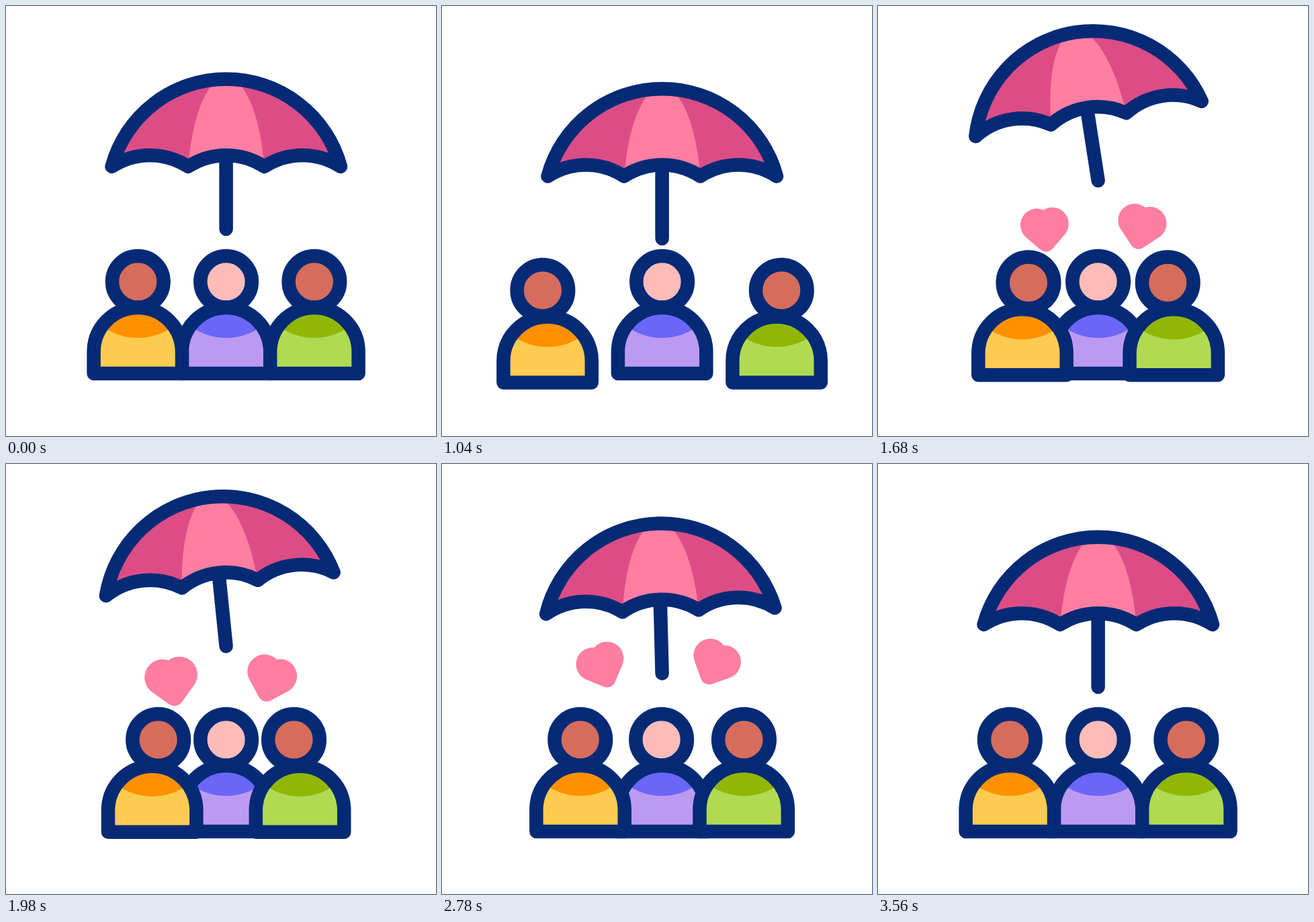
Write an HTML page that moves like this. It is 640 px wide and 640 px high and loops after 3600 ms.

```html
<!DOCTYPE html>
<html lang="en">
<head>
<meta charset="utf-8">
<title>People under an umbrella</title>
<style>
  html, body { margin: 0; height: 100%; overflow: hidden; background: #fff; }
  svg { display: block; width: 100vw; height: 100vh; }
  .line { stroke: #042a76; stroke-width: 20.5; stroke-linecap: round; stroke-linejoin: round; }
</style>
</head>
<body>
<svg id="stage" viewBox="0 0 640 640"></svg>
<script>
const LOOP = 3600;
const CENTER = 327.6;
const PINK = '#ff7ea1';
const stage = document.getElementById('stage');

// Smooth 0 to 1 between two times; a power above 1 delays the start.
function ease(time, start, end, power = 1) {
  const u = Math.min(1, Math.max(0, (time - start) / (end - start))) ** power;
  return u * u * (3 - 2 * u);
}

function add(markup) {
  stage.insertAdjacentHTML('beforeend', markup);
  return stage.lastElementChild;
}

function addUmbrella() {
  const scallop = 'a104 104 0 0 0 -113.5 0';
  const canopy = `M157.5 239A176.4 176.4 0 0 1 498 239${scallop.repeat(3)}Z`;
  const node = add(`<g>
    <path d="${canopy}" fill="#dc4d86"/>
    <path d="M271 239Q280 138 316 108H339.5Q375.5 138 384.5 239${scallop}Z" fill="${PINK}"/>
    <path class="line" d="${canopy}M${CENTER} 223V332" fill="none"/>
  </g>`);
  return (dy, angle) =>
    node.setAttribute('transform', `translate(0 ${dy}) rotate(${angle} ${CENTER} 332)`);
}

function addPerson(x, skin, shirt, collar) {
  const body = 'M-65.7 547V514.7A65.7 65.7 0 0 1 65.7 514.7V547Z';
  const node = add(`<g>
    <circle class="line" r="38.3" fill="${skin}"/>
    <path d="${body}" fill="${shirt}"/>
    <path d="M-53 476.4A65.7 65.7 0 0 1 53 476.4A88.5 88.5 0 0 1 -53 476.4Z" fill="${collar}"/>
    <path class="line" d="${body}" fill="none"/>
  </g>`);
  const head = node.firstElementChild;
  return (dx, dy, lean) => {
    node.setAttribute('transform', `translate(${x + dx} ${dy})`);
    head.setAttribute('cx', lean);
    head.setAttribute('cy', 410.3 - Math.abs(lean) / 12);
  };
}

// Hearts rise steadily, drift sideways and turn while pulsing.
function addHeart(x, y, drift, turn, pulse, birth) {
  const node = add(`<path fill="${PINK}"
    d="M-26.8 8.3A23 23 0 0 1 0 -28.5A23 23 0 0 1 26.8 8.3L8.5 26.5A12 12 0 0 1 -8.5 26.5Z"/>`);
  return time => {
    const p = Math.max(0, (time - 1400) / 1660);
    const scale = 1.08 + pulse * Math.cos((time - 1980) / 1080 * 2 * Math.PI);
    node.setAttribute('transform',
      `translate(${x + drift * p * p} ${y - 48.5 * p}) rotate(${turn(p)}) scale(${scale})`);
    node.setAttribute('opacity', ease(time, birth, birth + 230) - ease(time, 3080, 3420));
  };
}

const umbrella = addUmbrella();
const hearts = [
  addHeart(249, 342, -15.5, p => -27 * p, .09, 1410),
  addHeart(391, 338, 21.5, p => 28 * Math.sqrt(p), .03, 1350)
];
const middle = addPerson(CENTER, '#febcb9', '#bc9af3', '#6a66f7');
const left = addPerson(CENTER - 131.3, '#d66d5c', '#fdcb50', '#ff9100');
const right = addPerson(CENTER + 131.3, '#d66d5c', '#b0da51', '#91b704');

function draw(now) {
  const time = now % LOOP;
  const at = (start, end) => ease(time, start, end);
  const apart = ease(time, 100, 960, 1.575);
  const together = at(960, 1580);

  const lift = 19 * apart - 97 * at(1000, 1310) + 78 * at(1310, 3520);
  const swing = -10 * at(1320, 1780) + 16.4 * at(1780, 2390) - 11.2 * at(2390, 3000)
    + 8.8 * at(3000, 3350) - 4 * at(3350, 3560);
  umbrella(lift, swing);
  hearts.forEach(heart => heart(time));

  // Side people mirror each other; positive is towards the middle.
  const inward = -42 * apart + 60 * together + 5.2 * at(1500, 2300) - 23.2 * at(2460, 3040);
  const drop = 14 * apart - 11 * together - 3 * at(1400, 2300);
  const lean = -8 * apart + 17 * together - 16 * at(2460, 3040) + 7 * at(3060, 3560);
  middle(0, 0, -3 * at(2240, 2500) + 4 * at(2500, 3060) - at(3060, 3560));
  left(inward, drop, lean);
  right(-inward, drop, -lean);
  requestAnimationFrame(draw);
}
draw(0);
</script>
</body>
</html>
```
